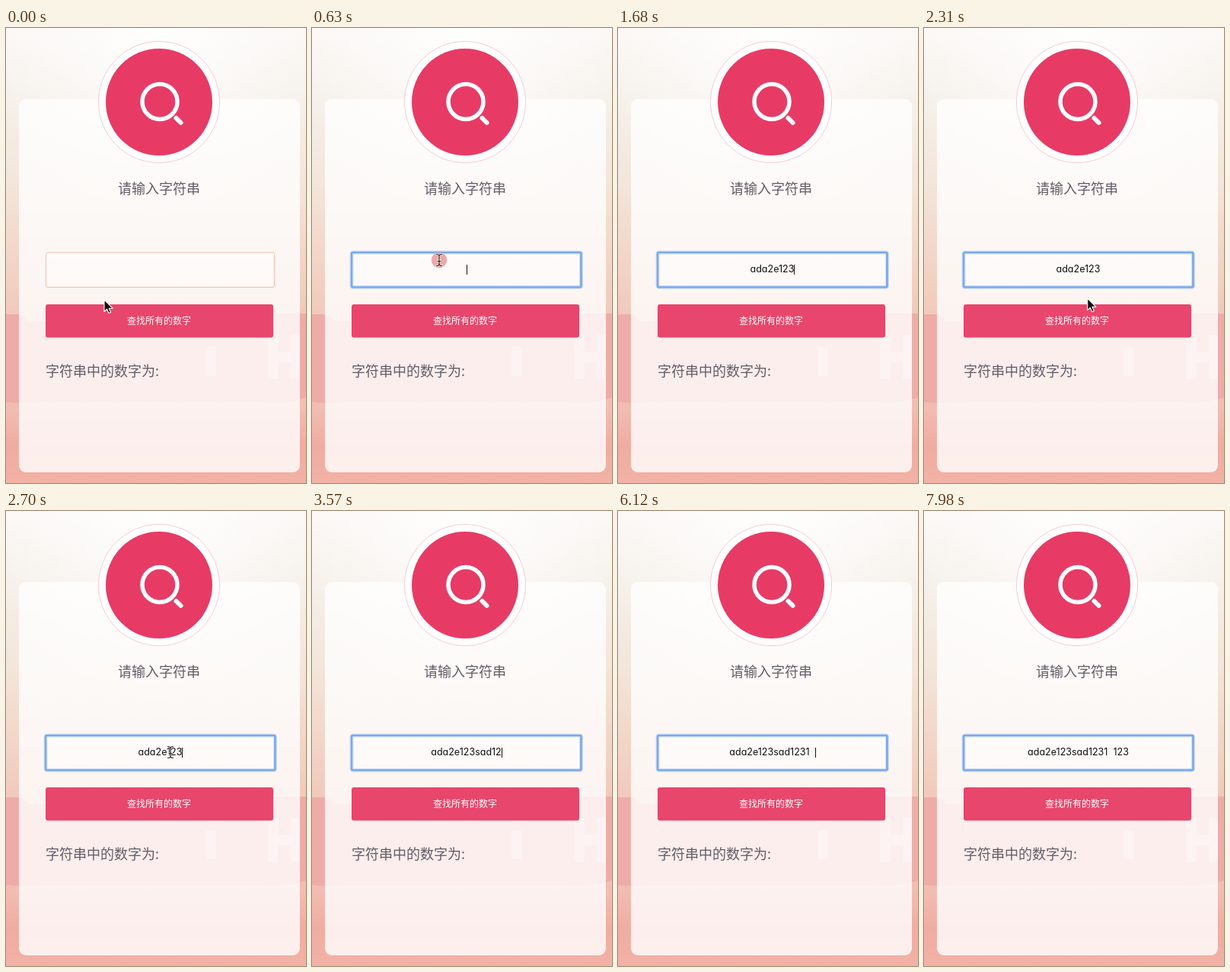
These frames come from a looping animation (394x596 px, 8000 ms). An HTML page:

```html
<!DOCTYPE html>
<html lang="zh-CN">
<head>
<meta charset="utf-8">
<title>查找数字</title>
<style>
  html, body { margin: 0; width: 100%; height: 100%; overflow: hidden; }
  svg { position: absolute; left: 0; top: 0; width: 394px; height: 596px; }
  text { font-family: "Noto Sans CJK SC", "Noto Sans CJK", sans-serif; font-size: 18px; fill: #625c66; }
  #field {
    position: absolute; left: 52px; top: 293px; width: 301px; height: 46px;
    display: flex; justify-content: center; align-items: center;
    font: 12.5px/46px Inter, sans-serif; font-feature-settings: "cv11"; color: #111;
  }
  #typed { white-space: pre; }
  #caret { width: 1px; height: 13px; margin: 1px -1px 0 0; background: #111; }
</style>
</head>
<body>
<svg viewBox="0 0 394 596">
  <defs>
    <linearGradient id="sky" x2="0" y2="1">
      <stop offset="0" stop-color="#fbf8f5"/>
      <stop offset=".17" stop-color="#f5efe8"/>
      <stop offset=".34" stop-color="#f3e6da"/>
      <stop offset=".5" stop-color="#f2d6c8"/>
      <stop offset=".63" stop-color="#f1c9bb"/>
      <stop offset=".84" stop-color="#f2bcb1"/>
      <stop offset=".92" stop-color="#f0aca1"/>
      <stop offset="1" stop-color="#f2b2a5"/>
    </linearGradient>
    <radialGradient id="glow" gradientUnits="userSpaceOnUse" cx="200" cy="20" r="230">
      <stop offset="0" stop-color="#fff" stop-opacity=".9"/>
      <stop offset="1" stop-color="#fff" stop-opacity="0"/>
    </radialGradient>
  </defs>
  <rect width="394" height="596" fill="url(#sky)"/>
  <rect width="394" height="260" fill="url(#glow)"/>
  <path d="M0 375H14Q24 375 30 384H300Q306 374 320 374H394V484Q370 492 340 490H40Q20 492 0 490Z" fill="#eeaca8"/>
  <path d="M262 418h14v38h-14zM344 402h14v22h16v-22h12v58h-12v-22h-16v22h-14z" fill="#f6cdc6" opacity=".7"/>
  <rect x="17" y="93" width="369" height="489" rx="9" fill="#fff" fill-opacity=".8"/>

  <circle cx="201" cy="97" r="79.5" fill="#fff" stroke="#f8cbd3"/>
  <circle cx="201" cy="97" r="70" fill="#e73b65"/>
  <g fill="none" stroke="#fff" stroke-linecap="round">
    <circle cx="202" cy="96.5" r="23" stroke-width="5.5"/>
    <path d="M223.5 118l6 6" stroke-width="6"/>
  </g>

  <text x="201" y="217" text-anchor="middle">请输入字符串</text>
  <rect x="52.5" y="294" width="300" height="45.5" rx="2.5" fill="#fff" fill-opacity=".4" stroke="#f5bda8"/>
  <g id="focus" fill="none" stroke="#78aaee">
    <rect x="52" y="294" width="301.5" height="45.5" rx="2" stroke-width="5" opacity=".3"/>
    <rect x="52" y="294" width="301.5" height="45.5" rx="1.5" stroke-width="2.6"/>
  </g>
  <rect x="52" y="362" width="299" height="43.5" rx="3" fill="#e8466c"/>
  <text x="201" y="388" text-anchor="middle" style="font-size:12px;font-weight:500;fill:#fff">查找所有的数字</text>
  <text x="52" y="456">字符串中的数字为:</text>
</svg>

<div id="field"><span id="typed"></span><i id="caret"></i></div>

<svg viewBox="0 0 394 596">
  <circle id="ring" cx="167" cy="304" fill="none" stroke="#e99a9c" stroke-width="8.5" opacity=".85"/>
  <path id="arrow" d="M0 0V15.5L3.6 12.2L6 17.6L8.6 16.5L6.3 11.2H11.2Z" fill="#111" stroke="#fff" stroke-width="1.1" stroke-linejoin="round"/>
  <g id="beam" fill="none" stroke-linecap="round">
    <path d="M-3.5 -7.5Q0 -7.5 0 -5Q0 -7.5 3.5 -7.5M0 -5V5M-3.5 7.5Q0 7.5 0 5Q0 7.5 3.5 7.5M-2 1.5H2" stroke="#fff" stroke-width="2.6" opacity=".8"/>
    <path d="M-3.5 -7.5Q0 -7.5 0 -5Q0 -7.5 3.5 -7.5M0 -5V5M-3.5 7.5Q0 7.5 0 5Q0 7.5 3.5 7.5M-2 1.5H2" stroke="#222" stroke-width="1.2"/>
  </g>
</svg>

<script>
const LOOP = 8000, STEP = 30, BLINK = 450, CLICK = 630, RING_END = 900;
const MESSAGE = 'ada2e123sad1231  123';

// [time, characters shown]; every entry also restarts the caret blink
const keys = [
  [CLICK, 0], [1080, 3], [1320, 4], [1350, 5], [1620, 6], [1650, 7], [1680, 8],
  [2880, 9], [2910, 10], [2940, 11], [3360, 12], [3570, 13], [3810, 14], [4680, 14],
  [4770, 15], [5970, 16], [6120, 17], [6570, 18], [6600, 19], [6630, 20]
];

// [time, x, y] of the mouse, and the spans in which it is visible
const stops = [
  [0, 129, 356], [120, 129, 356], [540, 167, 304], [900, 167, 304],
  [2070, 173, 310], [2400, 224, 364], [2700, 216, 316],
  [4230, 216, 316], [4470, 271, 325], [LOOP, 271, 325]
];
const shown = [[0, 900], [2070, 2880], [4230, 4800]];

const $ = id => document.getElementById(id);
const show = (id, on) => $(id).style.display = on ? '' : 'none';
const ease = p => p * p * (3 - 2 * p);

function mouseAt(t) {
  const i = stops.findIndex(s => s[0] > t);
  const [t0, x0, y0] = stops[i - 1], [t1, x1, y1] = stops[i];
  const p = ease((t - t0) / (t1 - t0));
  return [x0 + (x1 - x0) * p, y0 + (y1 - y0) * p];
}

function draw(t) {
  const key = keys.filter(k => k[0] <= t).pop();
  $('typed').textContent = key ? MESSAGE.slice(0, key[1]) : '';
  show('focus', key);
  show('caret', key && Math.floor((t - key[0]) / BLINK) % 2 === 0);

  const [x, y] = mouseAt(t);
  const visible = shown.some(([a, b]) => t >= a && t < b);
  const inField = y < 340;
  show('arrow', visible && !inField);
  show('beam', visible && inField);
  for (const id of ['arrow', 'beam']) $(id).setAttribute('transform', `translate(${x} ${y})`);

  const p = (t - CLICK) / (RING_END - STEP - CLICK);
  show('ring', t >= CLICK && t < RING_END);
  $('ring').setAttribute('r', 6 + 29.2 * Math.min(1, Math.max(0, p)));
}

function frame() {
  const t = performance.now() % LOOP;
  draw(t - t % STEP);
  requestAnimationFrame(frame);
}
frame();
</script>
</body>
</html>
```
